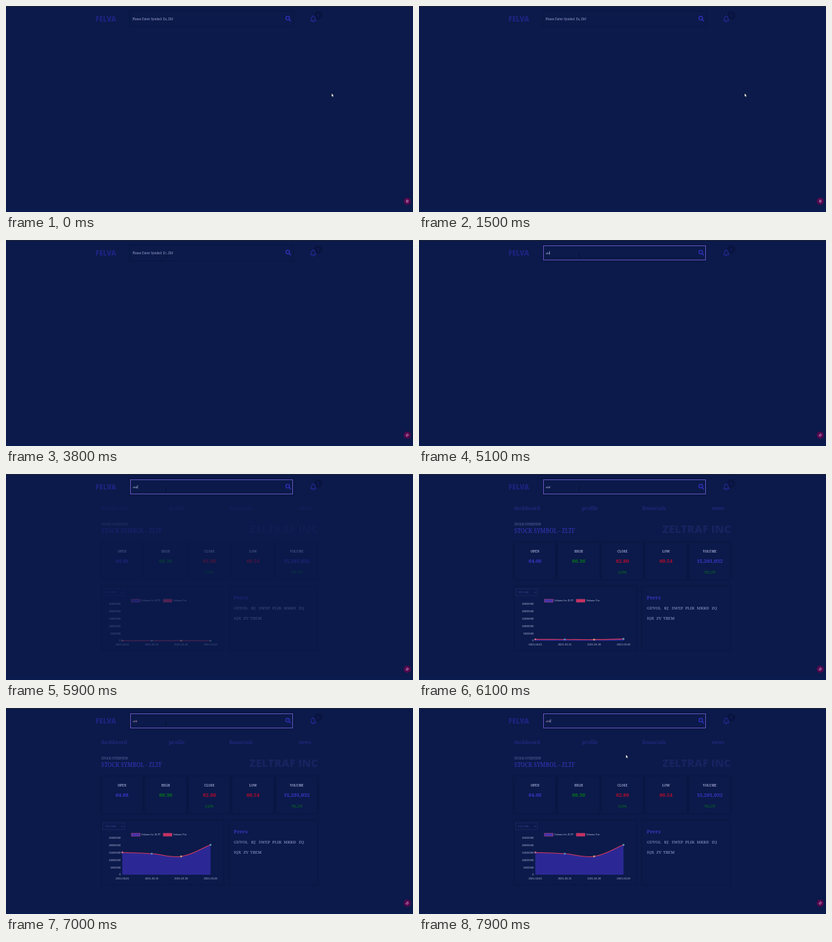
Recreate the animation shown at these times as an HTML page. Size 600 by 304 pixels, loop 8 s.

```html
<!DOCTYPE html>
<html lang="en">
<head>
<meta charset="utf-8">
<title>Stock dashboard</title>
<style>
  html, body { margin: 0; height: 100%; overflow: hidden; background: #0b1a4a; }
  svg { display: block; width: 100%; height: 100%; font-family: "Noto Serif", serif; }
  .sans { font-family: "Liberation Sans", Arial, sans-serif; }
  .brand { font-family: "Open Sans", sans-serif; font-weight: 800; }
  .mid { text-anchor: middle; }
  .end { text-anchor: end; }
  .small { font-size: 4.5px; }
  .value { font-size: 7.6px; font-weight: 700; }
  .panel { fill: #0b1a4a; filter: drop-shadow(0 0 1.8px #071136); }

  #pointer { animation: move 8s infinite; }
  #arrow { animation: arrow 8s step-end infinite; }
  #beam { animation: beam 8s step-end infinite; }
  #focus { animation: focus 8s linear infinite; }
  #results { animation: results 8s linear infinite; }

  @keyframes move {
    0%, 22.5% { transform: translate(480px, 129px); animation-timing-function: ease-in; }
    31.25% { transform: translate(433px, 102px); animation-timing-function: ease-out; }
    45%, 88.75% { transform: translate(236px, 22px); animation-timing-function: ease-in-out; }
    98.75%, 100% { transform: translate(305px, 69px); }
  }
  @keyframes arrow { 0% { opacity: 1; } 45% { opacity: 0; } 91.25%, 100% { opacity: 1; } }
  @keyframes beam { 0% { opacity: 0; } 45% { opacity: 1; } 91.25%, 100% { opacity: 0; } }
  @keyframes focus { 0%, 49.9% { opacity: 0; } 55%, 100% { opacity: 1; } }
  @keyframes results { 0%, 72.4% { opacity: 0; } 76%, 100% { opacity: 1; } }
</style>
</head>
<body>
<svg viewBox="0 0 600 304">
  <rect width="600" height="304" fill="#0b1a4a"/>
  <rect width="600" height="1" fill="#20252f"/>
  <rect y="300" width="600" height="4" fill="#0a1b50"/>

  <text class="brand" x="132" y="22.7" font-size="10" fill="#1e2380">FELVA</text>
  <rect class="panel" x="183" y="8" width="240" height="22" rx="1"/>
  <rect id="focus" x="183.5" y="8.5" width="239" height="21" fill="none" stroke="#6553bd"/>
  <text id="hint" x="186.5" y="20.5" font-size="4.4" fill="#a3a5d3">Please Enter Symbol: Ex, Zltf</text>
  <text id="typed" x="187" y="20.5" font-size="4.2"></text>
  <rect id="caret" y="16.5" width=".6" height="5" fill="#c8c8ea"/>
  <g fill="none" stroke="#302db4" stroke-linecap="round">
    <circle cx="415.3" cy="17.9" r="2.6" stroke-width="1.4"/>
    <path d="M417.4 20 L419.4 22" stroke-width="1.7"/>
  </g>
  <circle cx="460.3" cy="14" r="6" fill="#091440"/>
  <text class="mid" x="460.3" y="15.6" font-size="4.5" fill="#22277b">0</text>
  <path d="M449 21.8 Q450.4 20.5 450.4 17.8 Q450.6 15 453 14.8 Q455.4 15 455.6 17.8 Q455.6 20.5 457 21.8 Z M452 23.3 Q453 24.4 454 23.3 M453 14.7 V13.9"
    fill="none" stroke="#302db4" stroke-width=".9" stroke-linejoin="round"/>

  <g id="results">
    <g id="nav" font-size="7.5" fill="#292f91"></g>
    <text class="small" x="140.5" y="76" fill="#676ba8">STOCK OVERVIEW</text>
    <text x="140.5" y="87.3" font-size="8.4" fill="#3a35bd">STOCK SYMBOL - ZLTF</text>
    <text class="brand end" x="460" y="86.5" font-size="16" fill="#16235f">ZELTRAF INC</text>
    <g id="cards"></g>

    <rect class="panel" x="141" y="166" width="179" height="94"/>
    <rect x="142.5" y="169.5" width="32" height="10" fill="none" stroke="#1b2763" stroke-width=".8"/>
    <text x="146" y="175.8" font-size="3.8" fill="#3a3d91">VOLUME</text>
    <path d="M169.8 174 l1.3 1.3 l1.3 -1.3" fill="none" stroke="#4a4da0" stroke-width=".6"/>
    <g stroke-width=".9">
      <rect x="185" y="185" width="12.5" height="4" fill="#3a32ae" stroke="#9c3c86"/>
      <rect x="232" y="185" width="12.5" height="4" fill="#cf2f5c" stroke="#b63a72"/>
    </g>
    <g class="sans" font-size="3.9" fill="#b4b6da">
      <text x="199.3" y="188.4">Volume for ZLTF</text>
      <text x="246.5" y="188.4">Volume For</text>
      <g id="axes"></g>
    </g>
    <path id="area" fill="#2b2895"/>
    <path id="line" fill="none" stroke="#d8395f" stroke-width="1.1"/>
    <g id="dots"></g>

    <rect class="panel" x="329" y="166" width="130" height="94"/>
    <text x="335.7" y="185.3" font-size="7.4" font-weight="600" fill="#3a35c0">Peers</text>
    <g id="peers" font-size="6" fill="#9a9ed6"></g>
  </g>

  <circle cx="591.5" cy="288" r="5.2" fill="#55094f"/>
  <ellipse id="badge" cx="591.5" cy="288" rx="1.2" ry="1.7" fill="none" stroke="#e2b9dc" stroke-width=".8"/>

  <g id="pointer">
    <path id="arrow" d="M0 0 V4.8 L1.1 3.8 L1.9 5.5 L2.7 5.1 L1.9 3.5 H3.4 Z" fill="#fff" stroke="#111" stroke-width=".3"/>
    <path id="beam" d="M-1 -2.5 H1 M0 -2.5 V3 M-1 3 H1" fill="none" stroke="#07102f" stroke-width=".7"/>
  </g>
</svg>
<script>
  const LOOP = 8000, BASE = 246;
  const $ = id => document.getElementById(id);
  const label = (x, y, text, attrs = "") => `<text x="${x}" y="${y}" ${attrs}>${text}</text>`;

  $("nav").innerHTML = [[140, "dashboard"], [240, "profile"], [329, "financials"], [431.5, "news"]]
    .map(([x, s]) => label(x, 52.5, s)).join("");

  const BLUE = "#3c37cc", GREEN = "#087c18", RED = "#c00b2b";
  $("cards").innerHTML = [
    ["OPEN", "64.68", BLUE, ""], ["HIGH", "66.36", GREEN, ""],
    ["CLOSE", "62.80", RED, "0.20%"], ["LOW", "60.54", RED, ""],
    ["VOLUME", "15,261,032", BLUE, "791,279"]
  ].map(([title, value, color, note], i) => {
    const x = 171 + 64.4 * i;
    return `<rect class="panel" x="${x - 30.5}" y="101" width="61" height="54"/>` +
      label(x, 115.8, title, 'class="mid small" font-weight="600" fill="#a5a8d4"') +
      label(x, 130.8, value, `class="mid value" fill="${color}"`) +
      label(x, 147, note, `class="mid small" font-style="italic" fill="${GREEN}"`);
  }).join("");

  $("peers").innerHTML = [
    [336, 200, "GUVOL"], [361.5, 200, "KJ"], [372.5, 200, "SWEP"], [392.5, 200, "PLIK"],
    [409.5, 200, "MKRD"], [431.5, 200, "ZQ"],
    [336, 214.5, "IQX"], [350, 214.5, "ZV"], [360, 214.5, "TREM"]
  ].map(p => label(...p)).join("");

  const xs = [171.5, 214.9, 258.2, 301.5];
  const heights = [32.8, 31, 27, 44];
  const dotColors = ["#ff6384", "#36a2eb", "#ffce56", "#4bc0c0"];
  const dates = ["2021-04-01", "2021-03-31", "2021-03-30", "2021-03-29"];
  $("axes").innerHTML =
    [0, 1, 2, 3, 4, 5].map(i => label(169, 247.4 - 10.9 * i, i * 5000000, 'class="end"')).join("") +
    dates.map((d, i) => label(xs[i], 252.5, d, 'class="mid"')).join("");
  $("dots").innerHTML = xs.map((x, i) =>
    `<circle cx="${x}" r="1.1" fill="#8a86b8" stroke="${dotColors[i]}" stroke-width=".6"/>`).join("");
  const dots = [...$("dots").children];

  // Smooth curve whose handles follow the chord between neighbouring points.
  function spline(pts, tension = 0.4) {
    const handles = pts.map((p, i) => {
      const a = pts[i - 1] || p, b = pts[i + 1] || p;
      const d1 = Math.hypot(p[0] - a[0], p[1] - a[1]);
      const d2 = Math.hypot(b[0] - p[0], b[1] - p[1]);
      const at = k => [p[0] + k * (b[0] - a[0]), p[1] + k * (b[1] - a[1])];
      return { before: at(-tension * d1 / (d1 + d2)), after: at(tension * d2 / (d1 + d2)) };
    });
    return "M" + pts[0] + pts.slice(1).map((p, i) =>
      `C${handles[i].after} ${handles[i + 1].before} ${p}`).join("");
  }

  function drawChart(t) {
    const u = Math.min(1, Math.max(0, (t - 6085) / 1000));
    const grow = 1 - (1 - u) ** 4;
    const pts = xs.map((x, i) => [x, BASE - heights[i] * grow]);
    const curve = spline(pts);
    $("line").setAttribute("d", curve);
    $("area").setAttribute("d", `${curve}L${xs[3]} ${BASE}L${xs[0]} ${BASE}Z`);
    dots.forEach((dot, i) => dot.setAttribute("cy", pts[i][1]));
  }

  const word = "zltf", keys = [4600, 4800, 5000, 5500], focusAt = 4000;

  function drawInput(t) {
    const count = keys.filter(k => t >= k).length;
    const last = count ? keys[count - 1] : focusAt;
    const typed = $("typed");
    typed.textContent = word.slice(0, count);
    typed.setAttribute("fill", t < 6500 ? "#c8c8ea" : "#d6a5bd");
    $("hint").style.opacity = count ? 0 : 1;
    $("caret").setAttribute("x", 187.2 + (count ? typed.getComputedTextLength() : 0));
    $("caret").style.opacity = t >= focusAt && (t - last) % 1000 < 500 ? 1 : 0;
  }

  let start;
  function tick(now) {
    start ??= now;
    const t = (now - start) % LOOP;
    drawInput(t);
    drawChart(t);
    $("badge").setAttribute("transform", `rotate(${t < 1800 ? 0 : 35} 591.5 288)`);
    requestAnimationFrame(tick);
  }
  requestAnimationFrame(tick);
</script>
</body>
</html>
```
